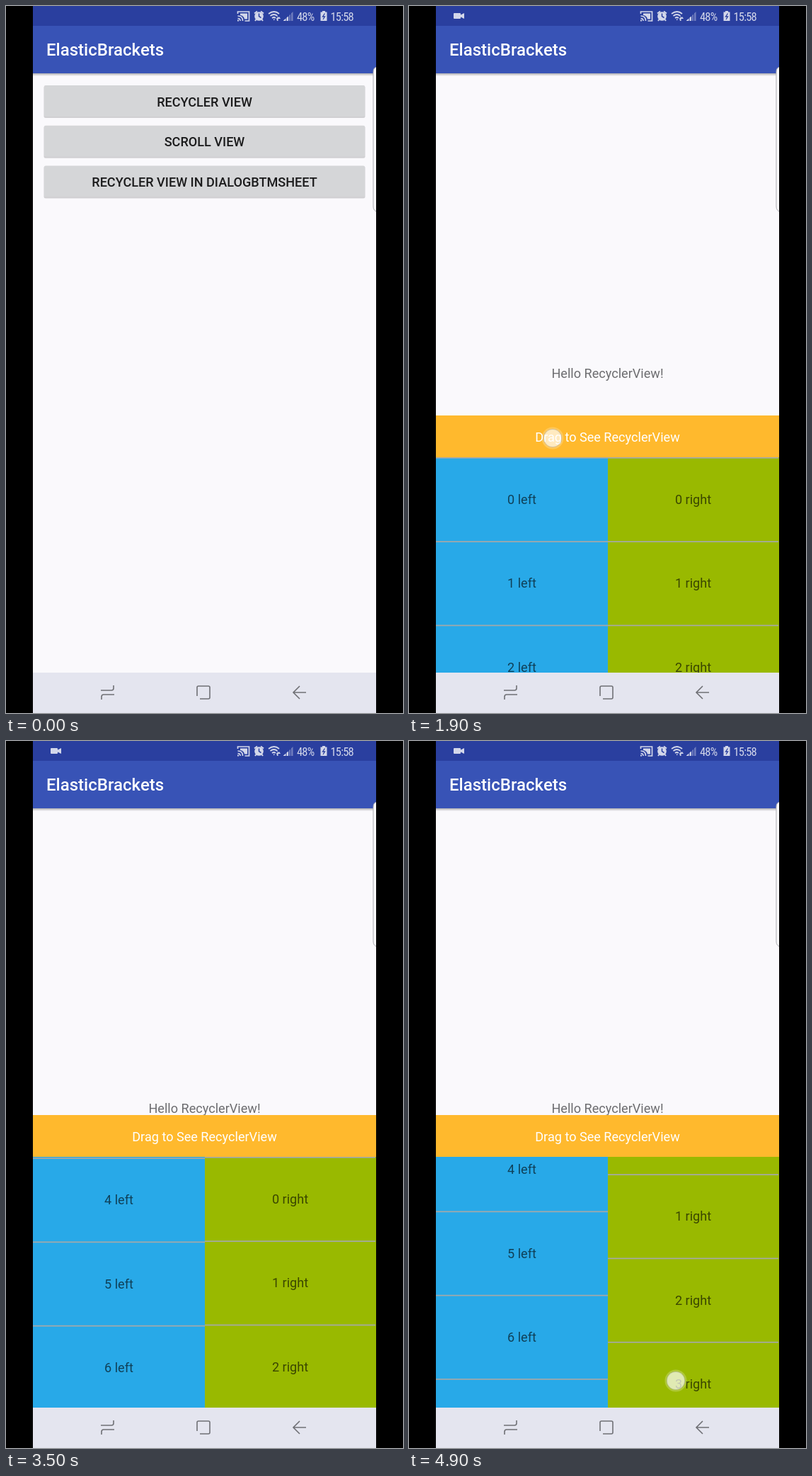
Recreate the animation shown at these times as an HTML page. Size 561 by 998 pixels, loop 5 s.

```html
<!DOCTYPE html>
<html lang="en">
<head>
<meta charset="utf-8">
<title>Bottom sheet demo</title>
<style>
  html, body { margin: 0; width: 100%; height: 100%; overflow: hidden; background: #000; }
  svg { display: block; }
  text { font: 18.1px Roboto, sans-serif; }
  .mid { text-anchor: middle; }
  .title { font-size: 24px; font-weight: 500; fill: #fff; }
  .label { font-weight: 500; fill: #1b1b1c; }
  .row { fill: #000; fill-opacity: .62; }
  .status text { font: 16.5px "Roboto Condensed", Roboto, sans-serif; letter-spacing: -.8px; }
  .line { fill: none; stroke: #6f7075; stroke-width: 1.6; }
</style>
</head>
<body>
<svg width="100%" height="100%" viewBox="0 0 561 998">
  <defs>
    <linearGradient id="shade" x2="0" y2="1">
      <stop stop-color="#000" stop-opacity=".3"/>
      <stop offset="1" stop-color="#000" stop-opacity="0"/>
    </linearGradient>
    <g id="window">
      <path fill="#faf9fc" d="M38 0h485v998H38z"/>
      <path fill="#3853b6" d="M38 0h485v95H38z"/>
      <path fill="#2a3f9f" d="M38 0h485v28H38z"/>
      <path fill="url(#shade)" d="M38 95h485v4H38z"/>
      <text class="title" x="57" y="70">ElasticBrackets</text>
    </g>
  </defs>
  <rect width="561" height="998"/>

  <svg x="38" width="485" height="998" viewBox="38 0 485 998">
    <use href="#window"/>
    <g id="menu"></g>

    <g id="page">
      <use href="#window"/>
      <text class="mid" x="280.5" y="525" fill="#6d6d70">Hello RecyclerView!</text>
      <g id="sheet">
        <svg x="38" y="59" width="485" height="370" viewBox="38 0 485 370">
          <path fill="#28a9e8" d="M38 0h243v370H38z"/>
          <path fill="#99b900" d="M281 0h242v370H281z"/>
          <g id="left"></g>
          <g id="right"></g>
        </svg>
        <path fill="#ffb92d" d="M38 0h485v59H38z"/>
        <text class="mid" x="280.5" y="36.5" fill="#fff">Drag to See RecyclerView</text>
      </g>
    </g>

    <path d="M524 86q-5 1-5 7v190q0 6 5 7" fill="#fafafc" stroke="#a9a9ae"/>
    <path fill="#e4e5ef" d="M38 941h485v57H38z"/>
    <g class="line">
      <path d="M134 966h15q3 0 3-3v-4M153 972h-15q-3 0-3 3v4"/>
      <path d="M270 974v-12q0-2 2-2h14q2 0 2 2v14q0 2-2 2h-12"/>
      <path d="M424 969h-18M415 960l-9 9 9 9"/>
    </g>
    <g id="touch">
      <circle r="15.5" fill="#fff" fill-opacity=".22"/>
      <circle r="12.7" fill="#fff" fill-opacity=".62" stroke="#999" stroke-opacity=".45"/>
    </g>
  </svg>

  <g class="status" fill="#d3d7ea">
    <path id="camera" d="M64 10h8q1 0 1 1v1.5l5-2.5v8l-5-2.5v1.5q0 1-1 1h-8q-1 0-1-1v-6q0-1 1-1z"/>
    <g fill="none" stroke="#d3d7ea" stroke-width="1.7">
      <path d="M327.500 11v-3h16v13h-6M327.500 14q7 0 7 7M327.500 17.500q3.500 0 3.500 3.500"/>
      <path d="M371 11q8-6 15 0M373.500 14q5-4 10 0M376 17q2.500-2 5 0"/>
    </g>
    <path d="M331 10.500h10v8h-4q-1-5-6-5.500zM327 19.500h2v2h-2zM377.500 18.500h2.500l-1.250 2z"/>
    <circle cx="357.500" cy="14.500" r="6.3"/>
    <path d="M351 10.500l4-3M364 10.500l-4-3M353.500 19l-1.500 2M361.500 19l1.500 2" stroke="#d3d7ea" stroke-width="2"/>
    <path d="M357.500 10.500v4.200l3 1.800" fill="none" stroke="#2a3f9f" stroke-width="1.5"/>
    <path id="arrows" d="M382 17h1.500v-3l2 3.500h-1v3.500h-1.500zM386 15l2 3h-4z"/>
    <path d="M392 20.500l3.500-3v3.500h-3.500zM396.500 16.500l2.500-2v6.500h-2.500z"/>
    <path d="M400 13.500l2-2v9.500h-2zM403 10.500l2.500-2.500v13H403z" fill-opacity=".42"/>
    <text x="411" y="20.500">48%</text>
    <path d="M447 7h4v1.500h2.500v12.500h-9V8.500h2.500z"/>
    <path d="M450.500 10.500l-3 4.500h3l-2.500 4" fill="none" stroke="#2a3f9f" stroke-width="1.300"/>
    <text x="458.500" y="20.500">15:58</text>
  </g>
</svg>
<script>
const $ = id => document.getElementById(id);
const LOOP = 5000, STEP = 100, PITCH = 118.3;

$('menu').innerHTML = ['RECYCLER VIEW', 'SCROLL VIEW', 'RECYCLER VIEW IN DIALOGBTMSHEET']
  .map((label, i) => {
    const y = 112 + i * 56.7;
    return `<rect x="53.5" y="${y + .5}" width="454" height="45.5" rx="2.5" fill="#000" fill-opacity=".17"/>
      <rect class="button" x="54" y="${y}" width="453" height="44" rx="2" fill="#d5d6d8"/>
      <text class="mid label" x="280.5" y="${y + 29.5}">${label}</text>`;
  }).join('');

function fillList(id, x, width) {
  $(id).innerHTML = Array.from({ length: 10 }, (_, i) => {
    const y = i * PITCH;
    return `<rect x="${x}" y="${y}" width="${width}" height="1.7" fill="#a5a9a8"/>
      <text class="mid row" x="${x + width / 2}" y="${y + 66}">${i} ${id}</text>`;
  }).join('');
}
fillList('left', 38, 243);
fillList('right', 281, 241);

// Linear interpolation through [time, value] pairs
function track(keys, t) {
  const i = keys.findIndex(k => k[0] > t);
  if (i < 0) return keys[keys.length - 1][1];
  if (i === 0) return keys[0][1];
  const [t0, a] = keys[i - 1], [t1, b] = keys[i];
  return a + (b - a) * (t - t0) / (t1 - t0);
}

const sheetTop = [[1600, 874], [1700, 858], [1800, 725], [1900, 578], [2000, 541], [2100, 528]];
const leftScroll = [[2600, 0], [2700, 16], [2800, 110], [2900, 190], [3000, 240], [3100, 272], [3200, 300],
  [3300, 385], [3400, 440], [3500, 472], [3600, 493], [3700, 507], [3800, 515]];
const rightScroll = [[3800, 0], [3900, 18], [4000, 120], [4100, 210], [4200, 265], [4300, 299],
  [4400, 315], [4500, 308], [4600, 268], [4700, 212], [4800, 150], [4900, 94]];
const place = (id, x, y) => $(id).setAttribute('transform', `translate(${x} ${y})`);
const show = (id, alpha) => $(id).setAttribute('opacity', alpha);

function draw(t) {
  const top = track(sheetTop, t), left = track(leftScroll, t), right = track(rightScroll, t);
  place('sheet', 0, top);
  place('left', 0, -left);
  place('right', 0, -right);

  show('camera', track([[0, 0], [300, 1]], t));
  show('arrows', t >= 4000 && t < 4400 ? .45 : 1);
  show('page', track([[700, 0], [1100, 1]], t));
  const rise = 1 - track([[700, 0], [1200, 1]], t);
  place('page', 0, 80 * rise ** 3);
  document.querySelector('.button').setAttribute('fill', t >= 500 && t < 900 ? '#c2c3c6' : '#d5d6d8');

  // Each press: start, end, x, y
  const press = [
    [500, 700, 300, 135],
    [1700, 2100, 203, top + 32],
    [2700, 3000, 155, 860 - left],
    [3200, 3500, 155, 1080 - left],
    [3900, 4200, 377, 860 - right],
    [4500, 5000, 377, 997 - right]
  ].find(p => t >= p[0] && t < p[1]);
  show('touch', press ? 1 : 0);
  if (press) place('touch', press[2], press[3]);
}

const start = performance.now();
function tick() {
  const t = (performance.now() - start) % LOOP;
  draw(Math.floor(t / STEP) * STEP);
  requestAnimationFrame(tick);
}
tick();
</script>
</body>
</html>
```
